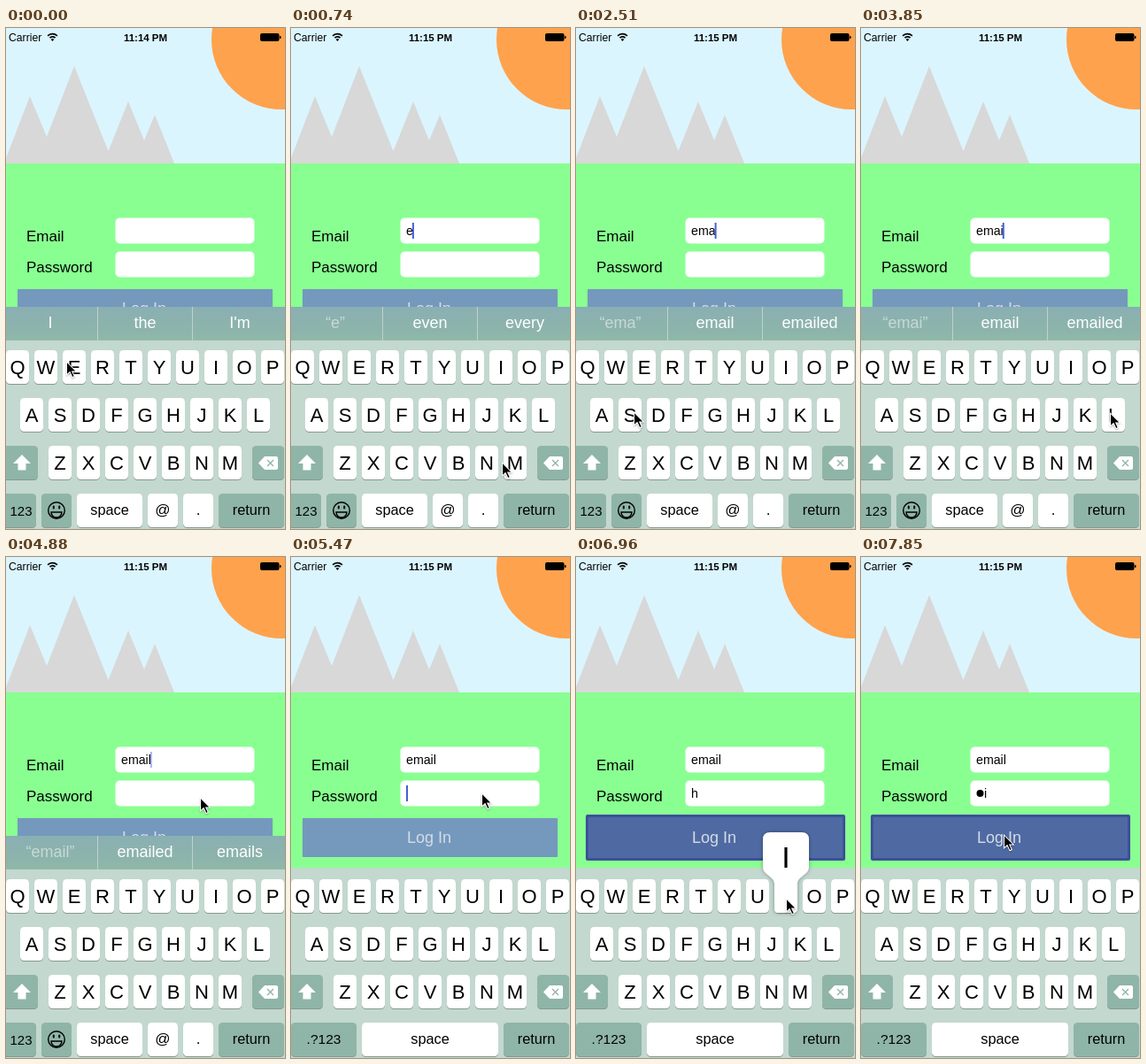
An HTML page with a canvas for the animation above (8000 ms loop, 315 px wide and 566 px high).

```html
<!DOCTYPE html>
<html lang="en">
<head>
<meta charset="utf-8">
<title>Log in form</title>
<style>
html, body { margin: 0; width: 100%; height: 100%; overflow: hidden; background: #89ff91; }
canvas { display: block; width: 315px; height: 566px; }
</style>
</head>
<body>
<canvas id="stage" width="315" height="566"></canvas>
<script>
const ctx = document.getElementById('stage').getContext('2d');
const LOOP = 8000, STEPS = 54;
const SANS = '"Liberation Sans", Arial, sans-serif';
const KEY_TINT = '#8fb5a8', BOARD = '#c3d8cf';

// Values that hold from a given step on: [step, value]
const EMAIL = [[0, ''], [1, 'e'], [9, 'em'], [17, 'ema'], [21, 'emai'], [28, 'email']];
const HINTS = [
  [0, ['I', 'the', "I'm"]],
  [1, ['“e”', 'even', 'every']],
  [9, ['“em”', 'email', 'emergency']],
  [17, ['“ema”', 'email', 'emailed']],
  [21, ['“emai”', 'email', 'emailed']],
  [28, ['“email”', 'emailed', 'emails']]
];
const SECRET = [[0, ''], [44, 'h'], [48, '●i']];
const PRESSED = { 1: 'E', 9: 'M', 20: 'I', 27: 'L', 43: 'H', 47: 'I' };
const PASSWORD_STEP = 35, ENABLE_STEP = 44;

// Pointer stops: step, x, y
const POINTER = [
  [0, 69, 377], [1, 70, 379], [5, 239, 491], [7, 244, 494], [10, 244, 494],
  [14, 24, 435], [16, 26, 436], [17, 66, 434], [20, 236, 383], [23, 236, 383],
  [26, 282, 435], [29, 282, 435], [33, 220, 272], [36, 216, 267], [38, 216, 267],
  [42, 187, 432], [44, 187, 433], [47, 238, 386], [49, 238, 386], [53, 162, 314]
];

const ROWS = [['QWERTYUIOP', 0, 364], ['ASDFGHJKL', 16, 418], ['ZXCVBNM', 48, 472]];

const at = (list, step) => list.filter(item => item[0] <= step).pop()[1];
const mix = (a, b, k) => a + (b - a) * k;
const smooth = k => k * k * (3 - 2 * k);

function rect(x, y, w, h, r, fill) {
  ctx.beginPath();
  ctx.roundRect(x, y, w, h, r);
  ctx.fillStyle = fill;
  ctx.fill();
}

function poly(points, fill) {
  ctx.beginPath();
  points.forEach(([x, y]) => ctx.lineTo(x, y));
  ctx.closePath();
  ctx.fillStyle = fill;
  ctx.fill();
}

function text(str, x, y, size, color = '#000', align = 'left', weight = 400) {
  ctx.font = `${weight} ${size}px ${SANS}`;
  ctx.textAlign = align;
  ctx.fillStyle = color;
  ctx.fillText(str, x, y);
}

function disc(x, y, r, fill) {
  ctx.beginPath();
  ctx.arc(x, y, r, 0, Math.PI * 2);
  ctx.fillStyle = fill;
  ctx.fill();
}

function scenery() {
  rect(0, 0, 315, 153, 0, '#dbf5ff');
  poly([[0, 153], [0, 147], [27, 77], [46, 123], [77, 43], [115.5, 139], [138, 83],
    [156, 127], [168, 98], [190, 153]], '#d8d8d8');
  disc(311, 13, 79, '#ffa24d');
  rect(0, 153, 315, 413, 0, '#89ff91');
}

function statusBar(step) {
  text('Carrier', 3, 15, 12.2);
  ctx.strokeStyle = '#000';
  ctx.lineWidth = 1.7;
  for (const r of [4.2, 7.4]) {
    ctx.beginPath();
    ctx.arc(52.5, 14, r, -Math.PI * 0.76, -Math.PI * 0.24);
    ctx.stroke();
  }
  poly([[52.5, 15], [50.6, 12.8], [52.5, 12], [54.4, 12.8]], '#000');
  text(step < 1 ? '11:14 PM' : '11:15 PM', 157.5, 15, 11.5, '#000', 'center', 700);
  rect(287, 6, 21.5, 9, 2, '#000');
  rect(309, 9, 1.5, 3, 0.7, '#000');
}

function caret(x, y, phase) {
  const alpha = phase < 0.4 || phase > 0.92 ? 0 : phase > 0.87 ? 0.45 : 1;
  ctx.globalAlpha = alpha;
  rect(x, y, 2, 18, 0, '#4260d8');
  ctx.globalAlpha = 1;
}

function form(step) {
  const secure = step >= PASSWORD_STEP;
  const email = at(EMAIL, step), secret = at(SECRET, step);
  text('Email', 23, 240.5, 17);
  text('Password', 23, 275.5, 17);
  rect(123.5, 214.5, 157, 29, 5, '#fff');
  rect(123.5, 252.5, 157, 29, 5, '#fff');
  text(email, 130, 234, 14.2);
  const emailEnd = 130 + ctx.measureText(email).width;

  let secretEnd = 130;
  for (const c of secret) {
    if (c === '●') {
      disc(134.5, 267, 4, '#000');
      secretEnd += 9;
    } else {
      text(c, secretEnd, 272, 14.2);
      secretEnd += ctx.measureText(c).width;
    }
  }
  const phase = (step / 6.75 + (secure ? 0.1 : 0)) % 1;
  caret(secure ? secretEnd : emailEnd - 1, secure ? 258 : 220, phase);
  loginButton(Math.min(1, Math.max(0, (step - ENABLE_STEP + 1) / 3)));
}

function loginButton(k) {
  const x = mix(13, 11, k), y = mix(295, 291, k);
  const w = mix(288, 293, k), h = mix(44, 52, k), edge = 3 * k;
  const tone = (a, b) => `rgb(${a.map((v, i) => Math.round(mix(v, b[i], k)))})`;
  rect(x, y, w, h, 2, tone([116, 153, 189], [61, 80, 154]));
  rect(x + edge, y + edge, w - 2 * edge, h - 2 * edge, 1, tone([116, 153, 189], [79, 106, 163]));
  text('Log In', 156, 323, 18, '#d5dce4', 'center');
}

function key(x, y, w, fill = '#fff') {
  rect(x, y + 1, w, 38, 4.5, '#87988f');
  rect(x, y, w, 38, 4.5, fill);
}

function label(str, x, y, w, size, fill = '#fff') {
  key(x, y, w, fill);
  text(str, x + w / 2, y + 24, size, '#000', 'center');
}

function shiftKey() {
  key(-6, 472, 42, KEY_TINT);
  poly([[18, 482], [28, 492], [22.5, 492], [22.5, 499.5], [13.5, 499.5], [13.5, 492], [8, 492]], '#fff');
}

function deleteKey() {
  key(278, 472, 36, KEY_TINT);
  ctx.beginPath();
  ctx.moveTo(285, 491.5);
  ctx.lineTo(292, 484);
  ctx.lineTo(305, 484);
  ctx.quadraticCurveTo(307, 484, 307, 486);
  ctx.lineTo(307, 497);
  ctx.quadraticCurveTo(307, 499, 305, 499);
  ctx.lineTo(292, 499);
  ctx.fillStyle = '#fff';
  ctx.fill();
  ctx.beginPath();
  ctx.moveTo(295, 488);
  ctx.lineTo(302, 495);
  ctx.moveTo(302, 488);
  ctx.lineTo(295, 495);
  ctx.strokeStyle = KEY_TINT;
  ctx.lineWidth = 1.4;
  ctx.stroke();
}

function smileyKey() {
  key(40, 526, 34, KEY_TINT);
  ctx.strokeStyle = '#000';
  ctx.lineWidth = 1.4;
  ctx.beginPath();
  ctx.arc(57, 545, 9.3, 0, Math.PI * 2);
  ctx.moveTo(63, 547);
  ctx.arc(57, 547, 6, 0, Math.PI);
  ctx.closePath();
  ctx.stroke();
  for (const x of [53.8, 60.2]) rect(x - 1, 539.5, 2, 4, 1, '#000');
}

function hintBar(words) {
  const shade = ctx.createLinearGradient(0, 315, 0, 353);
  shade.addColorStop(0, '#8aafb3');
  shade.addColorStop(0.7, '#8db4ab');
  shade.addColorStop(1, '#90b8a8');
  rect(0, 315, 315, 38, 0, shade);
  rect(103, 315, 1, 38, 0, '#bdd3ca');
  rect(210, 315, 1, 38, 0, '#bdd3ca');
  words.forEach((word, i) => {
    const color = word[0] === '“' ? '#c6dad3' : '#fff';
    text(word, 50 + 107 * i, 338.5, 18, color, 'center');
  });
}

function popup(char, x, y) {
  const mid = x + 13, top = y - 53;
  ctx.save();
  ctx.shadowColor = 'rgba(0,0,0,.35)';
  ctx.shadowBlur = 4;
  ctx.beginPath();
  ctx.moveTo(x, y + 34);
  ctx.lineTo(x, y + 6);
  ctx.bezierCurveTo(x, y - 4, mid - 26, y - 4, mid - 26, y - 14);
  ctx.lineTo(mid - 26, top + 8);
  ctx.quadraticCurveTo(mid - 26, top, mid - 18, top);
  ctx.lineTo(mid + 18, top);
  ctx.quadraticCurveTo(mid + 26, top, mid + 26, top + 8);
  ctx.lineTo(mid + 26, y - 14);
  ctx.bezierCurveTo(mid + 26, y - 4, x + 26, y - 4, x + 26, y + 6);
  ctx.lineTo(x + 26, y + 34);
  ctx.quadraticCurveTo(x + 26, y + 38, x + 22, y + 38);
  ctx.lineTo(x + 4, y + 38);
  ctx.quadraticCurveTo(x, y + 38, x, y + 34);
  ctx.fillStyle = '#fff';
  ctx.fill();
  ctx.restore();
  text(char, mid, y - 13, 34, '#000', 'center');
}

function keyboard(step) {
  const secure = step >= PASSWORD_STEP;
  rect(0, 351, 315, 215, 0, BOARD);
  if (!secure) hintBar(at(HINTS, step));
  let held = null;
  for (const [chars, left, y] of ROWS) {
    [...chars].forEach((char, i) => {
      const x = left + 32 * i;
      key(x, y, 26);
      text(char, x + 13, y + 27, 22, '#000', 'center');
      if (PRESSED[step] === char) held = [char, x, y];
    });
  }
  shiftKey();
  deleteKey();
  if (secure) {
    label('.?123', 0, 526, 74, 15.5, KEY_TINT);
    label('space', 80, 526, 154, 16.3);
  } else {
    key(-6, 526, 40, KEY_TINT);
    text('123', 17, 551, 15, '#000', 'center');
    smileyKey();
    label('space', 80, 526, 74, 16.3);
    label('@', 160, 526, 34, 17);
    label('.', 200, 526, 34, 17);
  }
  label('return', 240, 526, 74, 16.3, KEY_TINT);
  if (held) popup(...held);
}

function pointer(step) {
  const i = Math.max(0, POINTER.findLastIndex(p => p[0] <= step));
  const a = POINTER[i], b = POINTER[i + 1] || a;
  const k = b === a ? 0 : smooth((step - a[0]) / (b[0] - a[0]));
  ctx.save();
  ctx.translate(mix(a[1], b[1], k), mix(a[2], b[2], k));
  ctx.shadowColor = 'rgba(0,0,0,.3)';
  ctx.shadowBlur = 2;
  ctx.shadowOffsetY = 1;
  poly([[-1, -1], [-1, 16], [3, 12.7], [5.8, 18.5], [9, 17], [6.5, 11.5], [11.5, 11.5]], '#fff');
  ctx.shadowColor = 'transparent';
  poly([[0, 1.2], [0, 13.7], [3.3, 10.8], [6.2, 17], [7.6, 16.3], [4.9, 10.4], [9.2, 10.4]], '#000');
  ctx.restore();
}

function draw(now) {
  // The picture advances in even steps, as a screen capture does.
  const step = Math.floor((now % LOOP + 20) * STEPS / LOOP) % STEPS;
  scenery();
  statusBar(step);
  form(step);
  keyboard(step);
  pointer(step);
}

let start = null;
function tick() {
  const now = performance.now();
  if (start === null) start = now;
  draw(now - start);
  requestAnimationFrame(tick);
}
draw(0);
requestAnimationFrame(tick);
</script>
</body>
</html>
```
